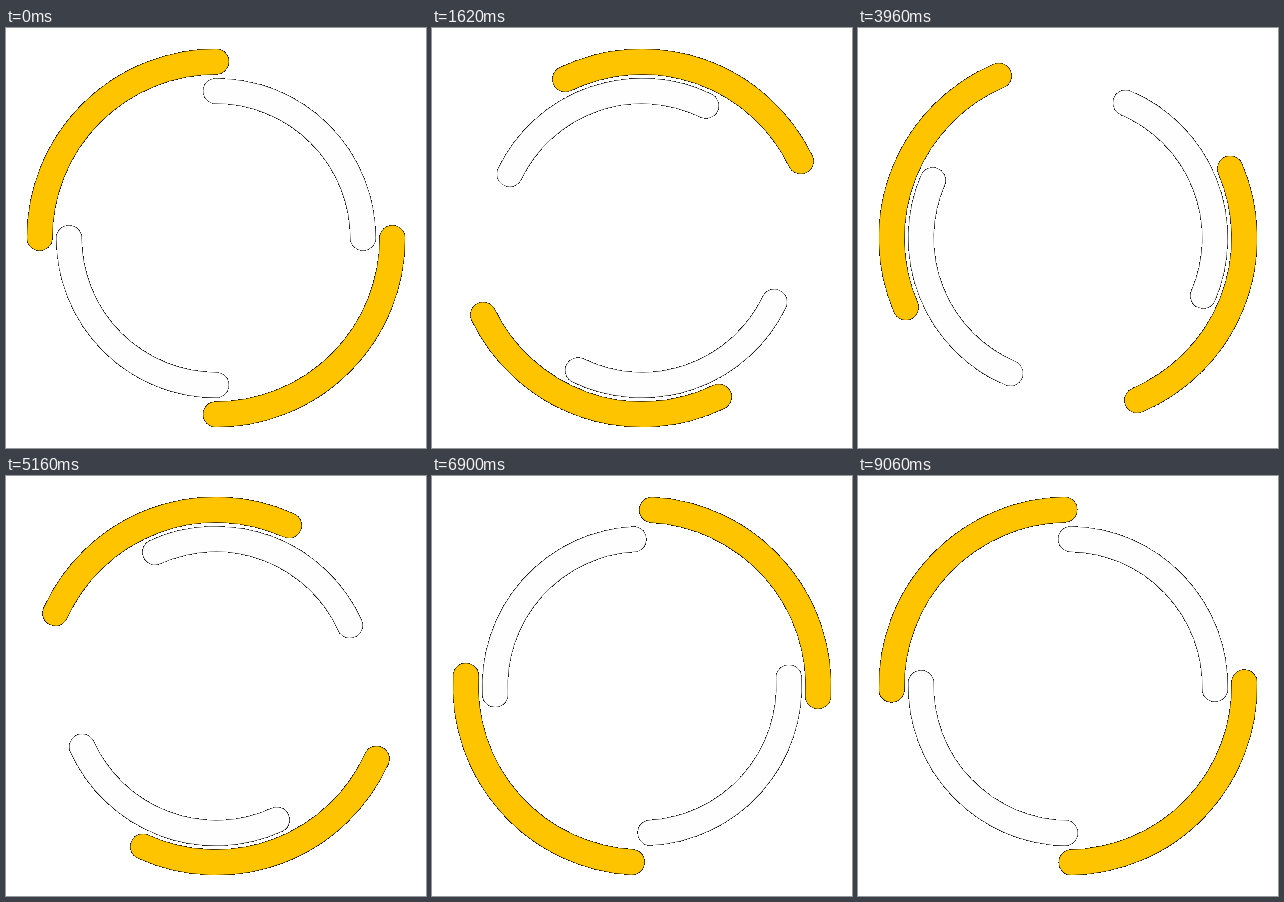
An HTML page without scripts for the animation above (9.09 s loop, 420x420 px).

```html
<!DOCTYPE html>
<html lang="en">
<head>
<meta charset="utf-8">
<title>Double ring spinner</title>
<style>
  html, body {
    margin: 0;
    width: 100%;
    height: 100%;
    overflow: hidden;
    background: #fff;
  }
  svg {
    display: block;
    width: 100vw;
    height: 100vh;
  }
  .ring {
    fill: none;
    stroke-width: 25.2px;
    stroke-linecap: round;
    stroke-dasharray: 1 1;
  }
  .outer { stroke: #ffc400; }
  .inner {
    stroke: #fefefe;
    stroke-dashoffset: 1;
  }
</style>
</head>
<body>
<svg viewBox="0 0 420 420">
  <!-- Blends soft edges with black, then makes them opaque: a thin dark rim -->
  <filter id="rim" filterUnits="userSpaceOnUse" x="0" y="0" width="420" height="420"
          color-interpolation-filters="sRGB">
    <feComponentTransfer in="SourceGraphic" result="hard">
      <feFuncA type="linear" slope="255"/>
    </feComponentTransfer>
    <feFlood flood-color="#000" result="black"/>
    <feComposite in="SourceGraphic" in2="black" operator="over"/>
    <feComposite in2="hard" operator="in"/>
  </filter>
  <!-- SVG animation redraws the arcs at each angle, so the rim stays crisp -->
  <g filter="url(#rim)">
    <circle class="ring outer" cx="210" cy="210" r="176.4" pathLength="4">
      <animateTransform attributeName="transform" type="rotate" dur="9.09s"
                        from="0 210 210" to="360 210 210" repeatCount="indefinite"/>
    </circle>
    <circle class="ring inner" cx="210" cy="210" r="147" pathLength="4">
      <animateTransform attributeName="transform" type="rotate" dur="9.09s"
                        from="0 210 210" to="-360 210 210" repeatCount="indefinite"/>
    </circle>
  </g>
</svg>
</body>
</html>
```
